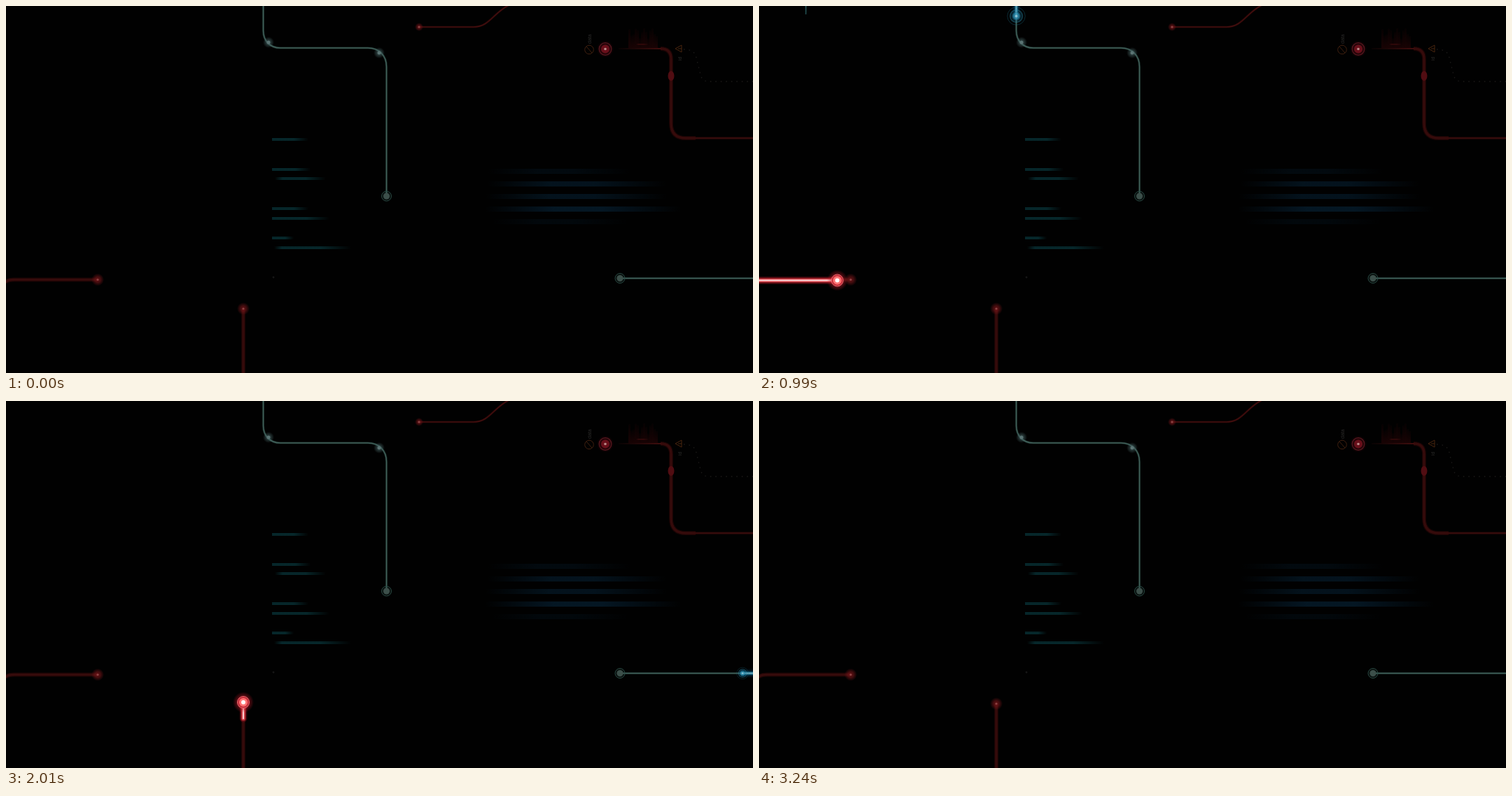
Recreate the animation shown at these times as an HTML page with a canvas. Size 1067x525 px, loop 3.33 s.

```html
<!DOCTYPE html>
<html lang="en">
<head>
<meta charset="utf-8">
<title>Circuit pulses</title>
<style>
html, body { margin: 0; width: 100%; height: 100%; overflow: hidden; background: #010101; }
canvas { display: block; }
</style>
</head>
<body>
<canvas id="stage" width="1067" height="525"></canvas>
<script>
const ctx = document.getElementById('stage').getContext('2d');
const LOOP = 3330, STEP = 30, TAU = Math.PI * 2;
const clamp = (v, lo = 0, hi = 1) => Math.min(hi, Math.max(lo, v));

const BLUE = {
  line: [[13, 'rgba(8,80,120,.22)'], [9, 'rgba(10,100,145,.5)'], [5, '#1b9ccb'], [2, '#d2f6ff']],
  halo: '30,140,180', reach: 14, core: 2.5,
  disc: [[8, '#1b6f8e'], [6, '#48b0d2']],
  rings: [[11, 2, '#2a87a5'], [16, 1.2, '#1d6d85']]
};
const RED = {
  line: [[11, 'rgba(110,12,20,.4)'], [8, '#7d151d'], [5, '#d9484f'], [1.8, '#ffdcdc']],
  halo: '190,25,40', reach: 15, core: 3,
  disc: [[8, '#c8303c'], [6, '#ff7474']],
  rings: [[8.5, 1, '#ee6a70']]
};
const ROSE = {
  line: [[10, 'rgba(100,12,20,.45)'], [7, '#81202a'], [4.5, '#d5525a'], [1.5, '#ffc4c4']],
  halo: '170,20,35', reach: 12, core: 2,
  disc: [[7, '#a51c2a'], [5, '#ea3d4c']],
  rings: [[8, 1.3, '#f08a90'], [12.3, 1, '#7a3a34']]
};

const TEAL_LINE = 'M367.5 0V35C367.5 50 377 60 392 60H517C533 60 543.5 71 543.5 87V272';

// start / leave: when head and tail enter the path; lit: distances of bulbs on it
const pulses = [
  { d: TEAL_LINE, look: BLUE, speed: .657, start: 968, leave: 1502, chase: 1, gone: 1980, size: 1, lit: [60, 214] },
  { d: 'M0 392.5H131', look: RED, start: 818, leave: 1060, gone: 1400 },
  { d: 'M339 525V431', look: RED, start: 1660, leave: 1901, gone: 2240 },
  { d: 'M1067 389.5H877', look: BLUE, start: 1987, leave: 2190, gone: 2510, size: .65 },
  { d: 'M1067 189H972Q950 189 950 167V76Q950 61 935 61H856', look: ROSE, start: 2203, leave: 2514, gone: 3230, lit: [200] }
].map(p => {
  const el = document.createElementNS('http://www.w3.org/2000/svg', 'path');
  el.setAttribute('d', p.d);
  return { speed: .65, chase: .65, size: 1, lit: [], ...p, el, path: new Path2D(p.d), len: el.getTotalLength() };
});

function disc(x, y, r, fill) {
  ctx.fillStyle = fill;
  ctx.beginPath();
  ctx.arc(x, y, r, 0, TAU);
  ctx.fill();
}

function ring(x, y, r, width, color) {
  ctx.strokeStyle = color;
  ctx.lineWidth = width;
  ctx.beginPath();
  ctx.arc(x, y, r, 0, TAU);
  ctx.stroke();
}

function glow(x, y, r, rgb, a) {
  const g = ctx.createRadialGradient(x, y, 0, x, y, r);
  g.addColorStop(0, `rgba(${rgb},${a})`);
  g.addColorStop(.45, `rgba(${rgb},${a * .7})`);
  g.addColorStop(1, `rgba(${rgb},0)`);
  disc(x, y, r, g);
}

function strokes(path, layers) {
  for (const [width, color] of layers) {
    ctx.lineWidth = width;
    ctx.strokeStyle = color;
    ctx.stroke(path);
  }
}

function wire(d, ...layers) { strokes(new Path2D(d), layers); }

// Scan-lined bar that fades towards its ends
function bar(x, y, w, rows, rgb, a, fadeIn) {
  const g = ctx.createLinearGradient(x, 0, x + w, 0);
  g.addColorStop(0, `rgba(${rgb},${fadeIn ? 0 : a})`);
  g.addColorStop(fadeIn || .01, `rgba(${rgb},${a})`);
  g.addColorStop(.6, `rgba(${rgb},${a})`);
  g.addColorStop(1, `rgba(${rgb},0)`);
  ctx.fillStyle = g;
  for (let i = 0; i < rows; i++) {
    ctx.globalAlpha = i % 2 ? .55 : 1;
    ctx.fillRect(x, y + i, w, 1);
  }
  ctx.globalAlpha = 1;
}

function sideText(text, x, y) {
  ctx.save();
  ctx.translate(x, y);
  ctx.rotate(-Math.PI / 2);
  ctx.fillStyle = '#2b2a29';
  ctx.font = '7px "Liberation Sans", sans-serif';
  ctx.fillText(text, 0, 0);
  ctx.restore();
}

function socket(x, y) {
  glow(x, y, 8, '50,85,78', .5);
  disc(x, y, 4.5, '#3c4f4a');
  ring(x, y, 7, 1, '#274640');
}

function ember(x, y, r) {
  glow(x, y, r, '115,20,24', .85);
  disc(x, y, 1.6, '#8c4444');
}

function drawBoard() {
  ctx.fillStyle = '#010101';
  ctx.fillRect(0, 0, 1067, 525);

  for (const [x, y, w, fade] of [[380, 189, 52, 0], [380, 232, 55, 0], [384, 245, 73, .15], [380, 288, 52, 0],
    [380, 302, 82, 0], [380, 330, 31, 0], [383, 344, 110, .1]]) bar(x, y, w, 4, '10,66,72', .75, fade);
  disc(382, 388, 1.5, '#161616');

  for (const [x, y, w, rows, a] of [[688, 233, 204, 7, .3], [688, 251, 255, 7, .62], [685, 269, 259, 7, .6],
    [684, 287, 280, 7, .75], [694, 305, 194, 7, .24]]) bar(x, y, w, rows, '7,38,60', a, .35);

  const teal = [[3.2, 'rgba(38,66,60,.55)'], [1.5, '#41605a']];
  wire(TEAL_LINE, ...teal);
  wire('M877 389.5H1067', ...teal);
  for (const [x, y] of [[375, 52], [533, 67]]) {
    glow(x, y, 8, '70,100,100', .7);
    disc(x, y, 2.5, '#5b7474');
  }
  socket(543.5, 272);
  socket(877, 389.5);

  const thick = [[6, 'rgba(50,8,8,.5)'], [3.5, '#360b0b']];
  wire('M590 30H668C690 30 696 10 718 -1', [3, 'rgba(50,8,8,.5)'], [1.6, '#430e0e']);
  wire('M-1 395Q3 391.5 11 391.5H131', ...thick);
  wire('M339 525V433', ...thick);
  wire('M935 61Q950 61 950 76V168Q950 189 971 189H985', ...thick);
  wire('M980 189H1067', [3.5, 'rgba(50,8,8,.6)'], [2, '#350b0b']);
  const fade = ctx.createLinearGradient(875, 0, 936, 0);
  fade.addColorStop(0, 'rgba(62,14,14,.1)');
  fade.addColorStop(1, '#400d0d');
  wire('M875 61H936', [2.2, fade]);
  ember(590, 30, 6);
  ember(131, 391.5, 9);
  ember(339, 433, 9);

  ctx.fillStyle = '#510d12';
  ctx.beginPath();
  ctx.ellipse(950, 100, 4.5, 7, 0, 0, TAU);
  ctx.fill();
  glow(856, 61.5, 12, '100,12,22', .7);
  disc(856, 61.5, 6, '#69101b');
  ring(856, 61.5, 8.8, 1.2, '#581820');
  disc(856, 61.5, 1.8, '#b88a88');

  // Dim signs, haze and dotted trail in the corner
  ring(833, 62.5, 6.3, 1, '#40200f');
  wire('M829 58L837 67', [1, '#40200f']);
  wire('M956 61L965 56V66ZM960 61H965', [1, '#4a260f']);
  sideText('data', 836, 54);
  sideText('id', 965, 78);
  for (let i = 0; i < 14; i++) {
    const h = 12 + 16 * Math.abs(Math.sin(i * 2.3 + 1.2));
    const g = ctx.createLinearGradient(0, 60 - h, 0, 60);
    g.addColorStop(0, 'rgba(48,5,7,.1)');
    g.addColorStop(1, 'rgba(48,5,7,.5)');
    ctx.fillStyle = g;
    ctx.fillRect(889 + i * 3, 60 - h, 3, h);
  }
  bar(900, 54, 18, 2, '75,14,16', .6, .2);
  ctx.setLineDash([1.5, 6]);
  wire('M968 62Q984 62 986 74L992 98Q994 108 1004 108H1067', [1.3, '#1c1a19']);
  ctx.setLineDash([]);
}

function drawHead({ x, y }, look, size, alpha) {
  ctx.save();
  ctx.translate(x, y);
  ctx.scale(size, size);
  ctx.globalAlpha = alpha;
  glow(0, 0, look.reach, look.halo, .85);
  for (const [r, color] of look.disc) disc(0, 0, r, color);
  for (const [r, w, color] of look.rings) ring(0, 0, r, w, color);
  disc(0, 0, look.core, '#fff');
  ctx.restore();
}

function drawPulse(p, t) {
  if (t < p.start || t >= p.gone) return;
  const head = clamp((t - p.start) * p.speed, 0, p.len);
  const tail = clamp((t - p.leave) * p.chase, 0, p.len);
  const arrived = p.leave + p.len / p.chase;
  const shown = p.look === BLUE ? clamp(.12 + head / 50) : 1;
  const alpha = shown * clamp((p.gone - t) / (p.gone - arrived));
  ctx.save();
  ctx.globalAlpha = alpha;
  if (head > tail) {
    ctx.lineCap = 'round';
    ctx.setLineDash([head - tail, 2000]);
    ctx.lineDashOffset = -tail;
    strokes(p.path, p.look.line);
    ctx.setLineDash([]);
  }
  for (const at of p.lit) {
    if (at > head || at < tail - 10) continue;
    const { x, y } = p.el.getPointAtLength(at);
    glow(x, y, 9, p.look.halo, .9);
    disc(x, y, 3, p.look === BLUE ? '#e8faff' : '#ff8088');
  }
  ctx.restore();
  drawHead(p.el.getPointAtLength(head), p.look, p.size * (.65 + .35 * shown), alpha);
}

function drawComet(t) {
  if (t < 90 || t > 1010) return;
  const x = 67;
  const y = 539 - 358 * ((t - 90) / 480) ** 1.285;
  const end = 345 + .793 * (570 - t);
  const g = ctx.createLinearGradient(0, y, 0, end);
  g.addColorStop(0, '#f2ffff');
  g.addColorStop(.35, '#a9dcdc');
  g.addColorStop(1, '#3c8d90');
  ctx.fillStyle = g;
  ctx.beginPath();
  ctx.moveTo(x - 2.3, y);
  ctx.lineTo(x + 2.3, y);
  ctx.lineTo(x + .4, end);
  ctx.lineTo(x - .4, end);
  ctx.fill();
  glow(x, y, 11, '110,185,185', .8);
  ring(x, y, 10, 1.2, '#93b5b3');
  ring(x, y, 13.5, 1, '#204f4e');
  disc(x, y, 5, '#b9efee');
  ctx.fillStyle = '#fff';
  ctx.beginPath();
  ctx.ellipse(x, y + 1, 3, 5, 0, 0, TAU);
  ctx.fill();
}

const origin = performance.now();
function frame() {
  const t = Math.floor((performance.now() - origin) / STEP) * STEP % LOOP;
  drawBoard();
  drawComet(t);
  for (const p of pulses) drawPulse(p, t);
  requestAnimationFrame(frame);
}
frame();
</script>
</body>
</html>
```
